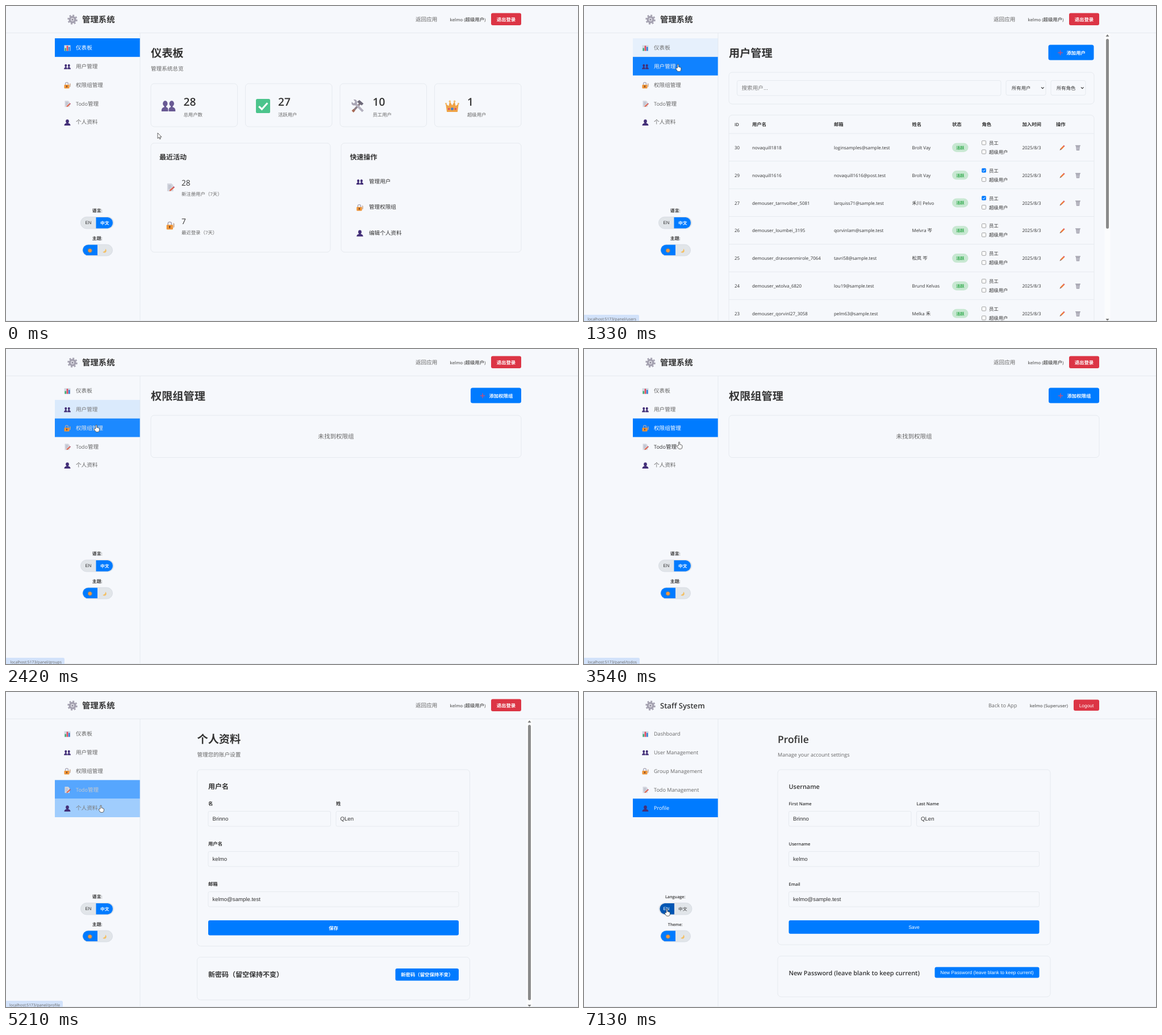
An HTML page for the animation above (8000 ms loop, 1007 by 556 pixels).

```html
<!DOCTYPE html>
<html lang="zh">
<head>
<meta charset="utf-8">
<title>管理系统</title>
<style>
html, body { margin: 0; height: 100%; overflow: hidden; background: #f6f8fc; }
svg { display: block; width: 100vw; height: 100vh; }
text { font-family: "Open Sans", "Noto Sans CJK SC", "DejaVu Sans", sans-serif; fill: #333; white-space: pre; text-rendering: geometricPrecision; }
tspan { font-size: .945em; }
.b { font-weight: 600; }
.b tspan { font-size: .91em; }
.a { font-family: "Liberation Sans", "Noto Sans CJK SC", sans-serif; }
.a tspan { font-size: 1em; }
.m { fill: #666; }
.g { fill: #777; }
.w { fill: #fff; }
.ok { fill: #28a745; }
.link { fill: #007bff; text-decoration: underline; }
.c { text-anchor: middle; }
.e { text-anchor: end; }
</style>
</head>
<body>
<svg id="stage" viewBox="0 0 1007 556" preserveAspectRatio="none">
<defs>
<symbol id="gear" viewBox="0 0 24 24"><g fill="none" stroke="#a4a1b0"><circle cx="12" cy="12" r="10" stroke-width="3.4" stroke-dasharray="3.93 3.93"/><circle cx="12" cy="12" r="6.2" stroke-width="5"/></g><circle cx="12" cy="12" r="4" fill="#d9d8e0"/><circle cx="12" cy="12" r="2" fill="#8d8a99"/></symbol>
<symbol id="chart" viewBox="0 0 24 24"><path d="M1 2h22v20H1z" fill="#cfd8e2"/><path d="M3 12h5v10H3z" fill="#3fae74"/><path d="M9.5 4h5v18h-5z" fill="#e0455c"/><path d="M16 8h5v14h-5z" fill="#2f7fd6"/></symbol>
<symbol id="user" viewBox="0 0 24 24"><g fill="currentColor"><ellipse cx="12" cy="8" rx="5.6" ry="6.6"/><path d="M1 23q0-7 8-8.5V12h6v2.5q8 1.5 8 8.5z"/></g></symbol>
<symbol id="users" viewBox="0 0 24 24"><g fill="currentColor"><ellipse cx="6.5" cy="8" rx="4" ry="4.8"/><ellipse cx="17.5" cy="8" rx="4" ry="4.8"/><path d="M0 21q0-6 4.8-7v-3h3.4v3q3 .6 3.3 4v3zM12.5 21v-3q.3-3.4 3.3-4v-3h3.4v3q4.8 1 4.8 7z"/></g></symbol>
<symbol id="lock" viewBox="0 0 24 24"><path d="M5 12V7q0-5 5-5t5 5v5" fill="none" stroke="#a9a5b4" stroke-width="2.6"/><rect x="1" y="10" width="18" height="13" rx="2" fill="#ef9436"/><circle cx="10" cy="15" r="2" fill="#5b3a2a"/><path d="M9 15h2v5H9z" fill="#5b3a2a"/><path d="M20 4l3 3v9l-3 3z" fill="#c8a48a"/></symbol>
<symbol id="memo" viewBox="0 0 24 24"><path d="M3 1h12l5 5v17H3z" fill="#d3d6df"/><path d="M6 7h8M6 11h9M6 15h6" stroke="#a6abba" stroke-width="1.4"/><path d="M10 19l9-8 3 3-9 8-4 1z" fill="#e2674f"/><path d="M19 11l2-2 3 3-2 2z" fill="#b04569"/></symbol>
<symbol id="check" viewBox="0 0 24 24"><rect width="24" height="24" rx="2.5" fill="#4cc48c"/><path d="M5 12.5l5 5L19.5 7" fill="none" stroke="#fff" stroke-width="3"/></symbol>
<symbol id="tools" viewBox="0 0 24 24"><path d="M4 21L17 7" stroke="#8d7f86" stroke-width="3.4"/><path d="M15 2l7 6-3 3-8-6z" fill="#6e6a7a"/><path d="M7 7l14 14" stroke="#b4b1bf" stroke-width="4"/><path d="M2 5l4 3 2-3-3-4q6-1 6 5t-6 5q-4-1-3-6z" fill="#a8a5b4"/><path d="M2 20l3-3 3 3-3 3z" fill="#a86a55"/></symbol>
<symbol id="crown" viewBox="0 0 24 24"><path d="M3 22L1 8l5 4 2-8 4 7 4-7 2 8 5-4-2 14z" fill="#efa347"/><g fill="#f3bd6d"><circle cx="1.5" cy="8" r="1.5"/><circle cx="8" cy="4" r="1.7"/><circle cx="16" cy="4" r="1.7"/><circle cx="22.5" cy="8" r="1.5"/></g><circle cx="12" cy="17" r="2.3" fill="#3f7fd0"/><circle cx="6.5" cy="17" r="1.6" fill="#d8466a"/><circle cx="17.5" cy="17" r="1.6" fill="#d8466a"/></symbol>
<symbol id="pencil" viewBox="0 0 24 24"><path d="M5 15L16 4l4 4L9 19z" fill="#ee7a3c"/><path d="M16 4l2-2 4 4-2 2z" fill="#d2496b"/><path d="M5 15l4 4-7 3z" fill="#8a6a5c"/></symbol>
<symbol id="trash" viewBox="0 0 24 24"><path d="M2 2h20v3.5H2zM4 6h16l-2 17H6z" fill="#a09fab"/><path d="M8 8l1 13M12 8v13M16 8l-1 13M5 12h14M6 17h12" stroke="#d8d8e0"/></symbol>
<symbol id="plus" viewBox="0 0 24 24"><path d="M12 2v20M2 12h20" stroke="#bd4f80" stroke-width="3.6"/></symbol>
<symbol id="sun" viewBox="0 0 24 24"><circle cx="12" cy="12" r="10" fill="none" stroke="#d9822b" stroke-width="3" stroke-dasharray="4 3.85"/><circle cx="12" cy="12" r="8.5" fill="#f79a3b"/></symbol>
<symbol id="moon" viewBox="0 0 24 24"><path d="M16 2q2 12-13 16 4 5 11 4 8-3 7-12-1-6-5-8z" fill="#f3bf63"/></symbol>
</defs>
<g id="pages"></g>
<g id="chrome"></g>
</svg>
<script>
const BLUE = '#007bff', LINE = '#e6eaef';
const $ = id => document.getElementById(id);
const clamp = x => Math.min(1, Math.max(0, x));
const ease = x => 1 - (1 - clamp(x)) ** 2.3;
const smooth = x => (x = clamp(x)) * x * (3 - 2 * x);

// Drawing helpers: text is centred vertically on y
const runs = s => s.replace(/[ -~]+/g, r => `<tspan>${r}</tspan>`);
const text = (x, y, s, size = 8.4, cls = '', attrs = '') =>
  `<text x="${x}" y="${y + size * .37}" font-size="${size}" class="${cls}" ${attrs}>${runs(s)}</text>`;
const rect = (x, y, x2, y2, fill, r = 0, attrs = '') =>
  `<rect x="${x}" y="${y}" width="${x2 - x}" height="${y2 - y}" rx="${r}" fill="${fill}" ${attrs}/>`;
const box = (x, y, x2, y2, r = 6) => rect(x, y, x2, y2, 'none', r, `stroke="${LINE}"`);
const line = (x, y, x2, y2) => `<path d="M${x} ${y}L${x2} ${y2}" stroke="${LINE}"/>`;
const icon = (id, x, y, size = 12, color = '#432f78') =>
  `<use href="#${id}" x="${x - size / 2}" y="${y - size / 2}" width="${size}" height="${size}" color="${color}"/>`;
const button = (x, y, x2, y2, s, cls = 'b', fill = BLUE) =>
  rect(x, y, x2, y2, fill, 3) + text((x + x2) / 2, (y + y2) / 2 + .3, s, 8.4, 'w c ' + cls);
const chevron = (x, y) => `<path d="M${x - 2.3} ${y - 1.2}l2.3 2.4 2.3-2.4" fill="none" stroke="#333" stroke-width="1.1"/>`;
const select = (x, y, x2, y2, s) =>
  box(x, y, x2, y2, 3) + text(x + 10, (y + y2) / 2, s) + chevron(x2 - 5.7, (y + y2) / 2);
const title = (x, y, s) => text(x, y, s, 19.2, 'b');
const scrollbar = end => rect(916.5, 48, 926.5, 556, '#fbfcfd') + rect(919, 58, 924, end, '#8a8a8a', 2.5) +
  '<path d="M918.5 54l3-4 3 4zM918.5 552l3 4 3-4z" fill="#7c7c7c"/>';

function dashboard() {
  const stats = [['users', 28, '总用户数'], ['check', 27, '活跃用户'], ['tools', 10, '员工用户'], ['crown', 1, '超级用户']];
  const recent = [['memo', '28', '新注册用户（7天）'], ['lock', '7', '最近登录（7天）']];
  const actions = [['users', '管理用户'], ['lock', '管理权限组'], ['user', '编辑个人资料']];
  return title(255, 83, '仪表板') + text(255, 110.5, '管理系统总览', 9.6, 'm') +
    stats.map(([id, n, label], i) => {
      const x = 255 + i * 166.5;
      return box(x, 137, x + 152.5, 213) + icon(id, x + 31, 176.5, 25, '#695a94') +
        text(x + 57.5, 168, '' + n, 21, 'b') + text(x + 57.5, 191.5, label, 8.4, 'm');
    }).join('') +
    box(255, 242, 571, 434.5) + box(590, 242, 907, 434.5) +
    text(270, 266.5, '最近活动', 12, 'b') + text(605.5, 266.5, '快速操作', 12, 'b') +
    recent.map(([id, n, label], i) => icon(id, 289.5, 320 + i * 67.5, 15) +
      text(309, 312 + i * 67.5, n, 14.4) + text(309, 332 + i * 67.5, label, 8.4, 'm')).join('') +
    actions.map(([id, label], i) => icon(id, 623, 310.5 + i * 45.3, 12.5) +
      text(639, 309.5 + i * 45.4, label, 9.6)).join('');
}

function users() {
  const heads = [[265, 'ID'], [296, '用户名'], [440, '邮箱'], [577.5, '姓名'], [648, '状态'], [700.5, '角色'], [771.5, '加入时间'], [831, '操作']];
  const people = [
    [30, 'novaquill1818', 'loginsamples@sample.test', 'Brolt Vay'],
    [29, 'novaquill1616', 'novaquill1616@post.test', 'Brolt Vay', 1],
    [27, 'demouser_tarnvolber_5081', 'larquiss71@sample.test', '禾川 Pelvo', 1],
    [26, 'demouser_loumbei_3195', 'qorvinlam@sample.test', 'Melvra 岑'],
    [25, 'demouser_dravosenmirole_7064', 'tavri58@sample.test', '松岚 岑'],
    [24, 'demouser_wtolva_6820', 'lou19@sample.test', 'Brund Kelvas'],
    [23, 'demouser_qorvinl27_3058', 'pelm63@sample.test', 'Melka 禾']];
  const checkbox = (y, on, label) => rect(700.5, y - 3.5, 707.5, y + 3.5, on ? BLUE : '#fff', 1.2, `stroke="${on ? BLUE : '#777'}" stroke-width=".7"`) +
    (on ? `<path d="M702 ${y}l1.5 1.7 2.7-3.4" fill="none" stroke="#fff"/>` : '') + text(713, y + .3, label);
  return title(255, 83, '用户管理') + rect(817.5, 68.5, 897.5, 95.5, BLUE, 3.5) +
    icon('plus', 838.5, 82.5, 10) + text(849.5, 82.5, '添加用户', 8.4, 'b w') +
    box(255, 117, 898, 173) + box(269.5, 131.5, 734, 158, 3) + text(277.5, 144.5, '搜索用户...', 9.6, 'a g') +
    select(743, 131.5, 813, 157.5, '所有用户') + select(822, 131.5, 883, 157.5, '所有角色') +
    box(255, 192.5, 898, 600) + heads.map(([x, s]) => text(x, 209, s, 8.4, 'b')).join('') +
    people.map(([id, user, mail, name, staff], i) => {
      const y = 249.7 + i * 48.85;
      return line(255, y - 24.7, 898, y - 24.7) + text(265, y, '' + id) + text(296, y, user) + text(440, y, mail) + text(577.5, y, name) +
        rect(648, y - 8, 676.5, y + 8, '#c8e8d2', 8) + text(662.2, y + .3, '活跃', 7.2, 'b ok c') +
        checkbox(y - 8.3, staff, '员工') + checkbox(y + 7.7, 0, '超级用户') +
        text(771.5, y, '2025/8/3') + icon('pencil', 842, y + .5, 11) + icon('trash', 869.5, y + .5, 10.5);
    }).join('') + scrollbar(393);
}

const groups = () => title(255, 83, '权限组管理') + rect(818, 68.5, 907, 95.5, BLUE, 3.5) +
  icon('plus', 839, 82.5, 10) + text(850.5, 82.5, '添加权限组', 8.4, 'b w') +
  box(255, 117, 907, 191.5) + text(581, 154.5, '未找到权限组', 10.56, 'm c');

function todos() {
  const heads = [[272.5, '标题 ↕'], [367.5, '描述'], [581, '状态'], [635, '创建者'], [714, '创建时间 ↓'], [805, '更新时间 ↕']];
  const items = [
    [261, '超时购物', 'kelmo', '9 16:39:33'],
    [297, '222222222', 'novaquill1818', '3 02:37:33'],
    [333, 'novaquill created', 'novaquill1818', '3 02:37:29'],
    [368.7, 'Feed the Dogs', 'Anonymous', '3 01:54:28', '3 01:54:37'],
    [427, '喂猫', 'Anonymous', '3 01:54:14'],
    [463, 'hello world', 'Anonymous', '3 01:36:30'],
    [499, 'kelmo---', 'kelmo000', '3 00:42:36'],
    [535, 'brinno todo', 'brinn', '3 00:38:32']];
  return title(264.5, 92, 'Todo管理') + `<g id="refresh">${button(842.5, 78.5, 888, 105, '刷新')}</g>` +
    box(264.5, 126.5, 888, 191.5) + text(279.5, 148, '搜索标题...', 8.4, 'm') + text(465, 148, '状态筛选', 8.4, 'm') + text(651, 148, '排序', 8.4, 'm') +
    box(279.5, 156.5, 456, 177.5, 3) + text(287, 167, '搜索标题...', 8.4, 'm') +
    select(465, 156.5, 642, 177.5, '全部') + select(651, 156.5, 828, 177.5, '创建时间（最新）') +
    box(837, 155.5, 873, 177.5, 3) + text(855, 167, '清空', 8.4, 'c') +
    box(264.5, 211, 888, 600) + heads.map(([x, s]) => text(x, 228.5, s, 8.4, 'b')).join('') +
    items.map(([y, name, owner, made, changed = made]) => line(264.5, y - 16.5, 888, y - 16.5) +
      text(272.5, y, name, 8.4, 'b') + text(585, y + 1.3, '未完成', 7.2, 'b') + text(635, y, owner) +
      text(714, y, '2025/8/' + made, 7.8, 'm') + text(805, y, '2025/8/' + changed, 7.8, 'm')).join('') +
    line(264.5, 554.5, 888, 554.5) +
    text(367.5, 368, 'Buy dog food from the store. Take it home and pour') +
    text(367.5, 380, "it into the dog's bowls. Make sure each dog gets ...") +
    text(367.5, 396, '显示更多', 7.2, 'link') + text(367.5, 426.5, '准备好猫粮，去喂家里的猫咪。') + scrollbar(491);
}

function profile(en) {
  const x = en ? 341 : 336.5, left = x + 19.5, right = x + 460.5;
  const [name, sub, user, first, last, mail, save, password] = en
    ? ['Profile', 'Manage your account settings', 'Username', 'First Name', 'Last Name', 'Email', 'Save', 'New Password (leave blank to keep current)']
    : ['个人资料', '管理您的账户设置', '用户名', '名', '姓', '邮箱', '保存', '新密码（留空保持不变）'];
  const field = (x, x2, y, label, value) => text(x, y, label, 8.4, 'b') + box(x, y + 13.5, x2, y + 40, 2.5) + text(x + 7.5, y + 26.8, value, 9.6, 'a');
  const cls = en ? 'a' : 'b';
  return title(x, 83, name) + text(x, 110.5, sub, 9.6, 'm') +
    box(x, 137, x + 480, en ? 446 : 448.5) + text(left, 166.5, user, 12, 'b') +
    field(left, left + 215.5, 197, first, 'Brinno') + field(left + 225, right, 197, last, 'QLen') +
    field(left, right, 268, user, 'kelmo') + field(left, right, 339, mail, 'kelmo@sample.test') +
    button(left, 403, right, en ? 426.7 : 429.5, save, cls) +
    (en ? box(x, 466, x + 480, 538) + button(right - 184, 485.5, right, 504.5, password, cls)
        : box(x, 468, x + 480, 543.5) + button(right - 111.5, 488, right, 509.5, password, cls) + scrollbar(544)) +
    text(left, en ? 495.5 : 499, password, 12, 'b');
}

const pages = [dashboard(), users(), groups(), todos(), profile(false), profile(true)];
$('pages').innerHTML = pages.map(p => `<g>${p}</g>`).join('');

// Timeline in milliseconds
const LOOP = 8000, ENGLISH = 6825;
const visits = [-1000, 1123, 2238, 4020, 5160];
const links = [[430, 97, 'users'], [1640, 103, 'groups'], [3000, 98, 'todos'], [4560, 100, 'profile'], [6250, 0]];
const track = [[80, 267, 224], [870, 165.5, 102.5], [1400, 165.5, 103], [1740, 158.5, 130], [2010, 158.5, 130], [2080, 159, 134], [2600, 159, 134],
  [3050, 166, 161], [3470, 166, 161], [3540, 167.5, 164], [3800, 167.5, 164], [4080, 168, 168], [4300, 168, 168], [4620, 166, 196], [4880, 166, 196],
  [4950, 167, 200], [5800, 167, 200], [6060, 168.5, 302.5], [6200, 168.5, 308], [6650, 146, 383]];
const nav = [['chart', '仪表板', 'Dashboard'], ['users', '用户管理', 'User Management'], ['lock', '权限组管理', 'Group Management'],
  ['memo', 'Todo管理', 'Todo Management'], ['user', '个人资料', 'Profile']];

function pointer(t) {
  const next = track.findIndex(k => k[0] > t);
  if (next < 1) return track.at(next).slice(1);
  const [a, b] = [track[next - 1], track[next]], k = smooth((t - a[0]) / (b[0] - a[0]));
  return [a[1] + (b[1] - a[1]) * k, a[2] + (b[2] - a[2]) * k];
}

function header(en) {
  const head = icon('gear', 117, 24, 18) + text(134, 23.5, en ? 'Staff System' : '管理系统', 14.4, 'b');
  return head + (en
    ? text(712, 23.5, 'Back to App', 9.6, 'm') + text(852, 23.5, 'kelmo (Superuser)', 8.4, 'b m e') + button(862, 13.5, 907, 33, 'Logout', 'a', '#dc3545')
    : text(721, 23.5, '返回应用', 9.6, 'm') + text(844.5, 23.5, 'kelmo (超级用户)', 8.4, 'b m e') + button(854, 12.5, 907, 34, '退出登录', 'b', '#dc3545'));
}

function sidebar(t, en, hover) {
  return nav.map(([id, zh, english], i) => {
    const on = ease((t - visits[i]) / 300) - (i < 4 ? ease((t - visits[i + 1]) / 300) : 0);
    const y = 57 + i * 32.8, ink = hover === i ? 51 : 102, shade = Math.round(ink + (255 - ink) * on);
    return rect(86, y, 235.7, y + 32.8, BLUE, 0, `opacity="${on}"`) + icon(id, 108, y + 17.3) +
      text(123, y + 16.7, en ? english : zh, 9.6, '', `style="fill:rgb(${shade},${shade},${shade})"`);
  }).join('');
}

function toggles(t, en) {
  const k = ease((t - ENGLISH) / 300), x = en ? 132 : 131.5, shadow = 'stroke="#d3d9e0" stroke-width=".8"';
  return text(160.7, 361, en ? 'Language:' : '语言:', 7.9, 'b c') + rect(x, 372.3, x + 58, 393, '#e1e5e9', 10.3, shadow) +
    `<path d="M${x + 27} 372.9h20.7a9.8 9.8 0 0 1 0 19.5h-20.7z" fill="${BLUE}" opacity="${1 - k}"/>` +
    `<path d="M${x + 27} 372.9h-16.7a9.8 9.8 0 0 0 0 19.5h16.7z" fill="#0056b3" opacity="${k}"/>` +
    text(145, 382.5, 'EN', 7.8, 'a c' + (en ? ' w' : '')) + text(173.7, 382.7, '中文', 7.8, en ? 'c' : 'b c w') +
    text(160.7, 409.7, en ? 'Theme:' : '主题:', 7.9, 'b c') + rect(134.8, 421, 187.5, 441, '#e1e5e9', 10, shadow) +
    `<path d="M161 421.5h-16.5a9.3 9.3 0 0 0 0 18.6H161z" fill="${BLUE}"/>` + icon('sun', 147.8, 431.7, 8.5) + icon('moon', 173.5, 432, 8.5);
}

function statusBar(t) {
  const link = links.findLast(l => l[0] <= t);
  if (!link || !link[1]) return '';
  return rect(-4, 545, link[1], 560, '#d2e2fa', 2.5) + text(link[1] - 5, 552, 'localhost:5173/panel/' + link[2], 7.2, 'm e');
}

function cursor(x, y, hand) {
  const shape = hand
    ? 'M-1 6.2V1a1 1 0 0 1 2 0v3.6l3 .6q1.4.4 1.4 1.8v2q0 3.3-2.4 3.4h-3q-1 0-1.8-1.4l-2-3.2q-.4-1.4 1-1.1z'
    : 'M0 0v9.8l2.3-2.1 1.5 3.3 1.5-.7-1.5-3.1h3.1z';
  return `<path transform="translate(${x} ${y})" d="${shape}" fill="#fff" stroke="#3a3a3a" stroke-width=".8" stroke-linejoin="round"/>`;
}

function draw(now) {
  const t = now % LOOP, en = t >= ENGLISH, [x, y] = pointer(t);
  const page = en ? 5 : visits.findLastIndex(v => v <= t);
  const row = x > 86 && x < 236 ? Math.floor((y - 57) / 32.8) : -1;
  const hover = row < nav.length ? row : -1;
  [...$('pages').children].forEach((g, i) => g.style.display = i === page ? '' : 'none');
  $('refresh').style.opacity = .6 + .4 * ease((t - 4120) / 300);
  $('chrome').innerHTML = line(0, 47.5, 1007, 47.5) + line(236, 48, 236, 556) + line(0, 555.5, 1007, 555.5) +
    header(en) + sidebar(t, en, hover) + toggles(t, en) + statusBar(t) + cursor(x, y, hover >= 0 || y > 372);
}

const start = performance.now();
function tick() {
  draw(performance.now() - start);
  requestAnimationFrame(tick);
}
tick();
</script>
</body>
</html>
```
